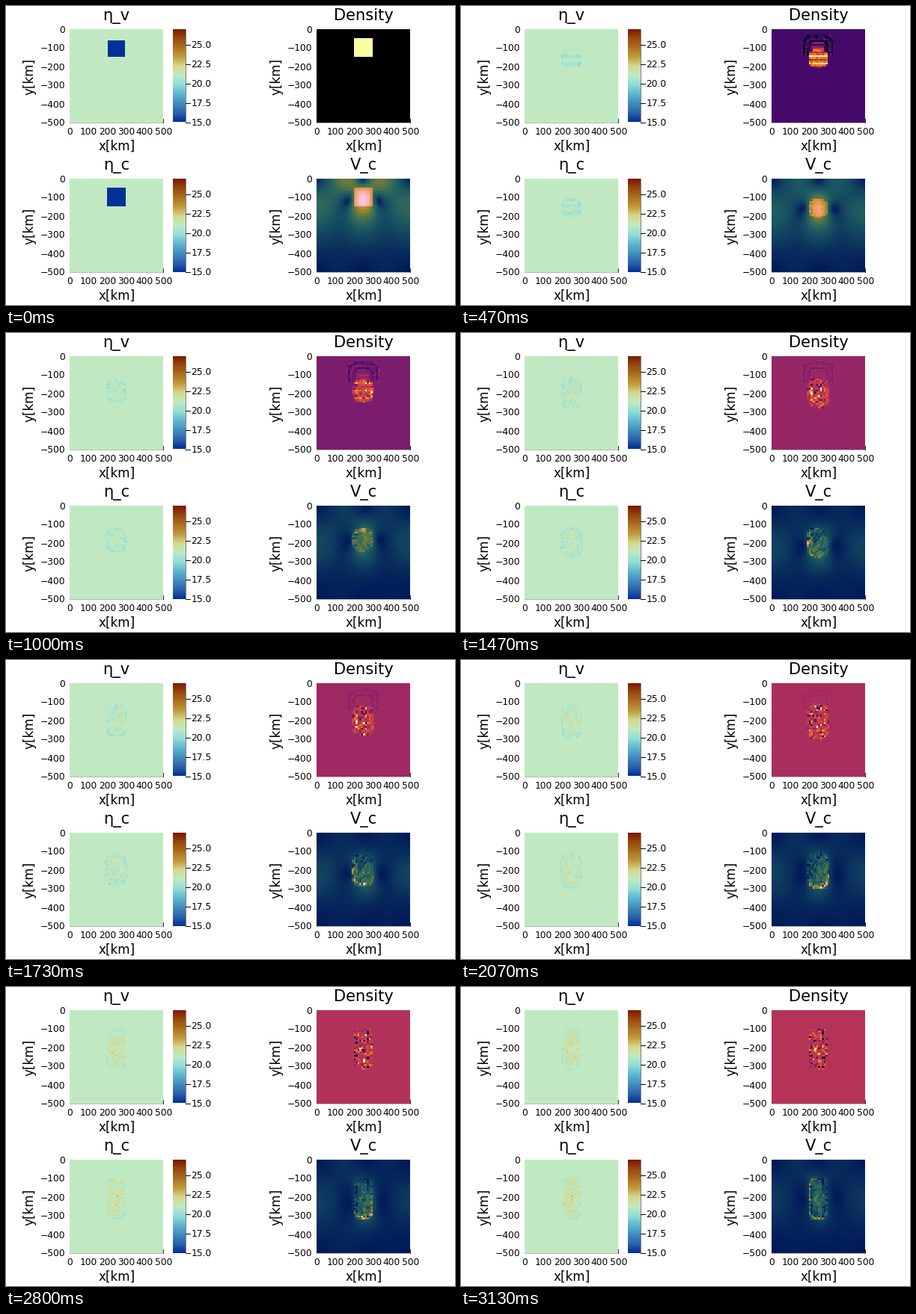
A matplotlib script that plays this animation: 600x400 px, repeating every 3.2 s.

```python
import numpy as np
import matplotlib.pyplot as plt
from matplotlib.animation import FuncAnimation
from matplotlib.colors import LinearSegmentedColormap
from matplotlib.lines import Line2D

W, H, DPI = 600, 400, 100
FRAMES, LOOP = 48, 3200
HOLD = 8  # frames over which one noise field turns into the next
TICK, LABEL, TITLE = 12.3, 16.8, 21
plt.rcParams["font.family"] = "DejaVu Sans"

roma = LinearSegmentedColormap.from_list("roma", [
    "#033198", "#2d63ac", "#438ebe", "#60b7d0", "#92ddd7", "#c0eac3",
    "#d5d88d", "#c09a3c", "#ac7020", "#974910", "#7e1700"])
batlow = LinearSegmentedColormap.from_list("batlow", [
    "#011959", "#103f60", "#1c5a62", "#3c6d56", "#687b3e",
    "#9d892b", "#d29343", "#f8a17b", "#fdb7bc", "#facafa"])

rng = np.random.default_rng(12)
NOISE = rng.normal(size=(3, FRAMES // HOLD + 1, 51, 51)).clip(-2, 2)

cells = (np.arange(50) + .5) * 10
GRIDS = {50: np.meshgrid(cells, cells),
         51: np.meshgrid(np.arange(51) * 10, np.arange(51) * 10)}


def decay(i, tau):
    return np.exp(-i / tau)


def grow(i, tau):
    return 1 - decay(i, tau)


def pulse(i, peak):
    return i / peak * np.exp(1 - i / peak)


def calm(i):
    """Share of smooth flow left before the motion breaks up."""
    return np.exp(-(i / 12) ** 2)


def noise(layer, i, n):
    k, t = i // HOLD, i % HOLD / HOLD * np.pi / 2
    a, b = NOISE[layer, k:k + 2]
    return (a * np.cos(t) + b * np.sin(t))[:n, :n]


def body(i, n):
    """Superellipse distance of the sinking block (inside < 1), its mask and neck."""
    x, d = GRIDS[n]
    u = i / FRAMES
    hw = 50 + 8 * np.sin(np.pi * u)
    top = 50 + 90 * grow(i, 5) - 45 * u
    bottom = 150 + 190 * grow(i, 20)
    p = 2.4 + 2.6 * u + 17.6 * decay(i, 2)
    mid, hh = (top + bottom) / 2, (bottom - top) / 2
    dx, dd = (x - 250) / hw, (d - mid) / hh
    s = np.abs(dx) ** p + np.abs(dd) ** p
    neck = (np.abs(x - 250) < 35) & (d > top - 42) & (d < top + 10)
    return s, np.clip((1 - s) * 6, 0, 1), neck, np.arctan2(dd, dx)


def stripes(d):
    return -np.cos(2 * np.pi * (d - 165) / 40)


def density(i):
    x, d = GRIDS[50]
    s, mask, neck, _ = body(i, 50)
    nz = noise(0, i, 50)
    banded = pulse(i, 6) ** 2
    bumps = .12 * grow(i, 10) * nz * np.abs(nz) * np.clip(2 * (1.1 - s), 0, 1)
    val = .5 * grow(i, 13) + bumps
    val += mask * (decay(i, 10) + .27 * banded * stripes(d))
    out = 1 - mask
    val += out * neck * banded * (.14 + .18 * stripes(d))
    r = (((x - 250) / 88) ** 4 + ((d - 112) / 86) ** 4) ** .25
    wake = out * ((r < 1) & (d < 140) & ~neck)
    rings = .4 + .6 * np.cos((r - .85) * 22)
    return val - wake * pulse(i, 7) * (.15 * rings + .05 * nz)


def viscosity(i, n, layer):
    x, d = GRIDS[n]
    u = i / FRAMES
    s, mask, neck, _ = body(i, n)
    nz = noise(layer, i, n)
    rim = np.exp(-((s - .8) / .3) ** 2)
    soft = grow(i, 4) * (1 - .6 * u) * (.35 * mask + .5 * rim)
    lines = .5 * pulse(i, 6) ** 2 * stripes(d) * (mask + .6 * neck)
    rise = .75 * u ** 1.5 * np.clip(1 - s, 0, 1)
    speck = .45 * grow(i, 10) * nz * np.clip(mask + .5 * rim, 0, 1)
    wake = np.exp(-((x - 250) / 60) ** 4 - ((d - 100) / 55) ** 4)
    faint = .14 * grow(i, 8) * nz * wake * (1 - mask)
    return 21 - 6 * decay(i, 1.7) * mask - soft - lines + rise + speck + faint


M = np.arange(1, 36)
PHASE = np.pi * np.outer(cells / 500, M)
SIN, COS = np.sin(PHASE), np.cos(PHASE)
K4 = (M[:, None] ** 2 + M ** 2) ** 2


def flow(force):
    """Speed of a free-slip Stokes flow driven by force, scaled to 1."""
    psi = (SIN.T @ force @ COS) * M / K4
    u = (COS * M) @ psi @ SIN.T
    v = SIN @ psi @ (COS * M).T
    speed = np.hypot(u, v)
    return speed / speed.max()


def velocity(i):
    s, mask, _, angle = body(i, 50)
    nz = noise(0, i, 50)
    smooth = calm(i)
    rough = 1 - smooth
    speed = flow(mask * (1 - .7 * rough + rough * nz))
    val = (.3 + .42 * smooth) * speed ** (1 + .4 * rough) + .25 * smooth * mask
    # a fast streak wanders along the rim of the broken-up block
    heading = np.radians(135 + 90 * np.cos(2 * np.pi * (i - 15) / 40))
    side = (.5 + .5 * np.cos(angle - heading)) ** 1.5
    rim = np.exp(-((s - .7) / .3) ** 2)
    val += rough * rim * side * (.45 + .2 * nz)
    return val + .07 * rough * mask * nz


fig = plt.figure(figsize=(W / DPI, H / DPI), dpi=DPI, facecolor="white")


def box(x, y, w, h):
    ax = fig.add_axes([x / W, 1 - (y + h) / H, w / W, h / H])
    ax.axis("off")
    return ax


def put(x, y, s, px, ha="center", rot=0):
    fig.text(x / W, 1 - y / H, s, fontsize=px * 72 / DPI, ha=ha, va="baseline",
             rotation=rot, rotation_mode="anchor", color="black")


def line(x0, y0, x1, y1, color="black", lw=.6):
    fig.add_artist(Line2D([x0 / W, x1 / W], [1 - y0 / H, 1 - y1 / H],
                          color=color, lw=lw, zorder=-1))


def panel(x, y, title, cmap, lo, hi):
    put(x + 62.5, y - 12, title, TITLE)
    put(x + 63, y + 161.5, "x[km]", LABEL)
    put(x - 48.5, y + 63, "y[km]", LABEL, rot=90)
    for k in range(6):
        put(x + .5 + 25 * k, y + 141, str(100 * k), TICK)
        put(x - 5.5, y + 4.5 + 25 * k, f"\N{MINUS SIGN}{100 * k}" if k else "0", TICK, "right")
    line(x, y, x, y + 125, "0.5", .4)
    line(x, y + 125, x + 125, y + 125, "0.5", .4)
    line(x + 125, y + 125, x + 125, y + 120)
    ax = box(x, y, 125, 125)
    return ax.imshow(np.zeros((50, 50)), cmap=cmap, vmin=lo, vmax=hi,
                     aspect="auto", interpolation="nearest")


def colorbar(x, y):
    ramp = np.linspace(1, 0, 256)[:, None]
    box(x, y, 17, 124.5).imshow(ramp, cmap=roma, aspect="auto")
    line(x + 17, y, x + 17, y + 125, "0.3", .5)
    for v in np.arange(15, 27, 2.5):
        ty = y + 125 * (27 - v) / 12
        line(x + 17, ty, x + 22.5, ty, lw=.7)
        put(x + 24.5, ty + 4.5, f"{v:.1f}", TICK, "left")


eta_v = panel(85, 31, "η_v", roma, 15, 27)
rho = panel(415, 31, "Density", "inferno", 0, 1)
eta_c = panel(85, 231, "η_c", roma, 15, 27)
vel = panel(415, 231, "V_c", batlow, 0, 1)
colorbar(223, 31)
colorbar(223, 231)


def draw(i):
    eta_v.set_data(viscosity(i, 51, 1))
    eta_c.set_data(viscosity(i, 50, 2))
    rho.set_data(density(i))
    vel.set_data(velocity(i))
    return eta_v, eta_c, rho, vel


anim = FuncAnimation(fig, draw, frames=FRAMES, interval=LOOP / FRAMES,
                     repeat=True, repeat_delay=0)
plt.show()
```
